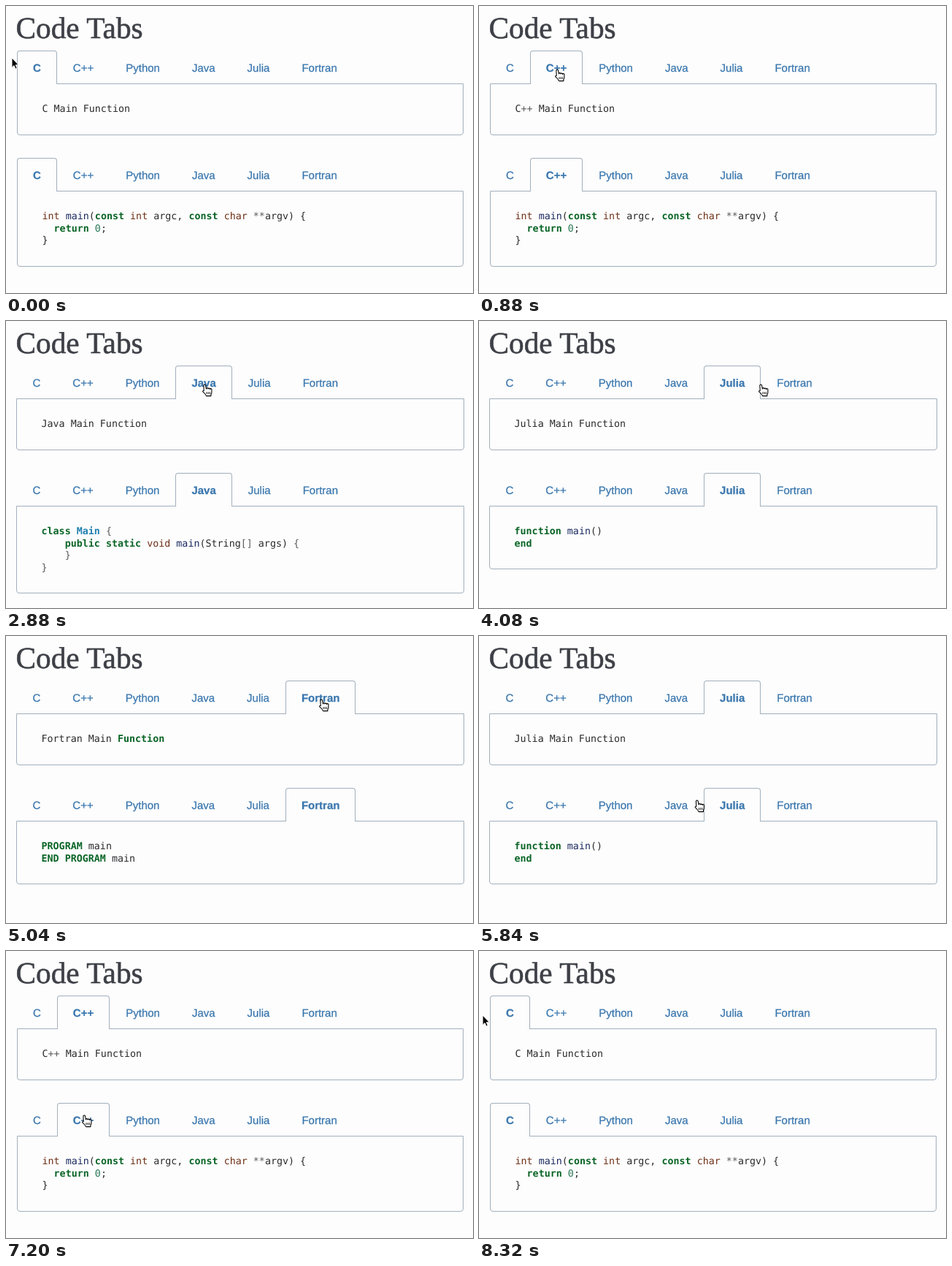
Recreate the animation shown at these times as an HTML page. Size 640 by 393 pixels, loop 8400 ms.

```html
<!DOCTYPE html>
<html lang="en">
<head>
<meta charset="utf-8">
<title>Code Tabs</title>
<style>
html, body { margin: 0; width: 100%; height: 100%; overflow: hidden; background: #fdfdfd; }
body { position: relative; text-rendering: geometricPrecision; }
h1 { position: absolute; left: 13.5px; top: 7px; margin: 0; color: #3e4047;
  font: 41.3px/46px "Liberation Serif", serif; -webkit-text-stroke: .6px; white-space: nowrap; }
.group { position: absolute; left: 0; }
.tabs { position: absolute; top: 0; display: flex; z-index: 1; }
.tab { box-sizing: border-box; height: 46px; padding: 0 21px; border: 1px solid transparent;
  border-bottom: 0; border-radius: 4px 4px 0 0; color: #3a77ae; white-space: nowrap;
  font: 15px/48px "Liberation Sans", Arial, sans-serif; -webkit-text-stroke: .25px; }
.tab.on { border-color: #a2b0bc; background: #fdfdfd; font-weight: bold; }
pre { position: absolute; top: 45px; box-sizing: border-box; margin: 0; padding: 27px 33.5px;
  border: 1px solid #a2b0bc; border-radius: 0 0 4px 4px; color: #2b2b2e;
  font: 13.35px/16.6px "DejaVu Sans Mono", monospace; }
pre b { color: #0a6526; }
pre b.name { color: #1f7fb0; }
pre i { color: #6f3018; font-style: normal; }
pre u { color: #1b2b60; text-decoration: none; }
pre s { color: #5c5c5c; text-decoration: none; }
pre em { color: #2c7a58; font-style: normal; }
svg { position: absolute; left: 0; top: 0; z-index: 2; width: 640px; height: 393px; }
</style>
</head>
<body>
<h1>Code Tabs</h1>
<div class="group" style="top:61px"><div class="tabs"></div><pre></pre></div>
<div class="group" style="top:208px"><div class="tabs"></div><pre></pre></div>
<svg stroke-linejoin="round">
  <path id="arrow" d="M0 0V13.4L3 10.6L5 15.2L7.2 14.2L5.2 9.8H9.3Z" fill="#000" stroke="#fff"/>
  <g id="hand" fill="#fff" stroke="#000" stroke-width="1.1">
    <path d="M-1.8 8.5L-2.1 1.6A1.35 1.35 0 0 1 .6 1.2L1.4 6A1.3 1.3 0 0 1 4 5.9A1.3 1.3 0 0 1 6.5 6.5A1.2 1.2 0 0 1 8.9 7.4V10.6Q8.7 12.4 7.9 13.4V15.6H1.6Q.6 13-3.4 9.7A1.2 1.2 0 0 1-1.8 8.5Z"/>
    <path d="M2 10.2V13M4.2 10.2V13M6.3 10.2V13" stroke-width=".9"/>
  </g>
</svg>
<script>
const LOOP = 8400, STEP = 80;
const cCode = '<i>int</i> <u>main</u>(<b>const</b> <i>int</i> argc, <b>const</b> <i>char</i> <s>**</s>argv) {\n' +
  '  <b>return</b> <em>0</em>;\n}';
// x is where the pointer clicks the tab
const pages = [
  { name: 'C', x: 42, note: 'C Main Function', code: cCode },
  { name: 'C++', x: 108, note: 'C<s>++</s> Main Function', code: cCode },
  { name: 'Python', x: 185, note: 'Python Main Function', code: '<b>def</b> <u>main</u>():\n    <b>return</b>' },
  { name: 'Java', x: 273, note: 'Java Main Function',
    code: '<b>class</b> <b class="name">Main</b> <s>{</s>\n' +
      '    <b>public</b> <b>static</b> <i>void</i> <u>main</u>(String<s>[]</s> args) <s>{</s>\n    <s>}</s>\n<s>}</s>' },
  { name: 'Julia', x: 346, note: 'Julia Main Function', code: '<b>function</b><u> main</u>()\n<b>end</b>' },
  { name: 'Fortran', x: 433, note: 'Fortran Main <b>Function</b>',
    code: '<b>PROGRAM</b> main\n<b>END PROGRAM</b> main' }
];

// Right along the upper tabs, then faster back along the lower ones.
const last = pages.length - 1;
const stops = [{ time: 0, page: 0, x: 8, y: 71 }];
for (let k = 1; k <= 2 * last; k++) {
  const page = last - Math.abs(last - k), back = k > last;
  const period = back ? 520 : 960;
  const time = back ? 5080 + period * (k - last) : period * k - 80;
  stops.push({ time, period, page, x: pages[page].x, y: back ? 225 : 87 });
}
stops.push({ time: 8200, period: 520, page: 0, x: 5, y: 88 });

const groups = [...document.querySelectorAll('.group')];
const arrow = document.getElementById('arrow'), hand = document.getElementById('hand');
let shown = -1;

function select(index) {
  if (index === shown) return;
  shown = index;
  const wide = index > 1, left = wide ? 14 : 15;
  groups.forEach((group, g) => {
    const [tabs, pre] = group.children;
    const text = g ? pages[index].code : pages[index].note;
    tabs.style.left = (wide ? 14.5 : 15) + 'px';
    tabs.innerHTML = pages.map((p, i) => `<div class="tab${i === index ? ' on' : ''}">${p.name}</div>`).join('');
    pre.innerHTML = text;
    pre.style.left = left + 'px';
    pre.style.width = 642 - 2 * left + 'px';
    pre.style.height = Math.round(54 + 16.6 * text.split('\n').length) + 'px';
  });
}

// Each move starts soon after the previous click and takes half a period.
function pointerAt(t) {
  let { x, y } = stops[0];
  for (const s of stops.slice(1)) {
    const u = (t - s.time + s.period - 80) / (s.period * .52);
    const v = Math.max(0, Math.min(1, u)), e = v * v * (3 - 2 * v);
    x += (s.x - x) * e;
    y += (s.y - y) * e;
  }
  return [x, y];
}

function draw(now) {
  const t = Math.floor(now % LOOP / STEP) * STEP;
  select(stops.filter(s => s.time <= t).pop().page);
  const [x, y] = pointerAt(t);
  const onTab = x > 15 && x < 480 && [61, 208].some(top => y >= top && y < top + 45);
  arrow.style.display = onTab ? 'none' : '';
  hand.style.display = onTab ? '' : 'none';
  (onTab ? hand : arrow).setAttribute('transform', `translate(${x} ${y})`);
}

const start = performance.now();
function tick() {
  draw(performance.now() - start);
  requestAnimationFrame(tick);
}
tick();
</script>
</body>
</html>
```
